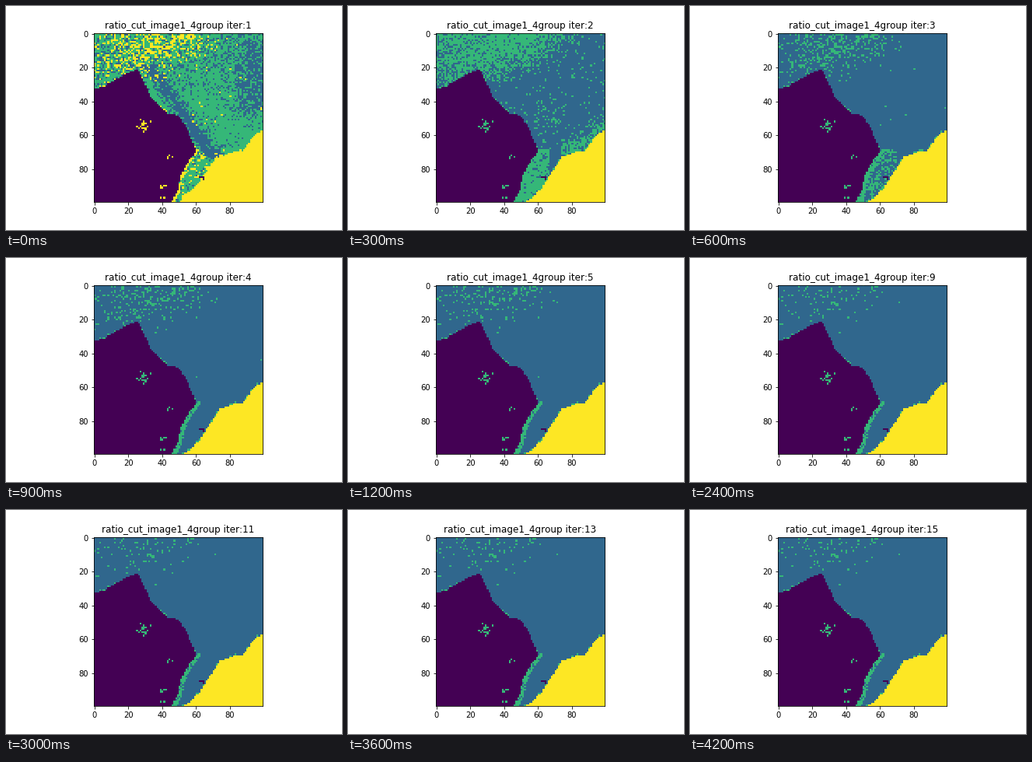
Animation, 432 px wide and 288 px high, one loop 4.5 s. Source, as a matplotlib script:

```python
import numpy as np
import matplotlib.pyplot as plt
from matplotlib.animation import FuncAnimation

N = 100
FRAMES = 15
PURPLE, BLUE, GREEN, YELLOW = range(4)

rng = np.random.default_rng(11)
grain = rng.normal(size=(N, N))
mix, fleck = rng.random((2, N, N))
Y, X = np.mgrid[0:N, 0:N] + .5
mid = np.arange(N) + .5


def curve(*points):
    """Polyline through the points, sampled at cell centres."""
    xs, ys = zip(*points)
    return np.interp(mid, xs, ys)


def bump(cx, cy, w):
    return np.exp(-((X - cx) ** 2 + (Y - cy) ** 2) / w ** 2)


def step(v, soft):
    return 1 / (1 + np.exp(-v / soft))


# Region outlines in cell units
ridge = curve((0, 33.2), (6, 32), (18, 24.8), (26, 21.5), (30, 30), (34, 39),
              (43, 47.5), (50, 49), (54, 55), (60.5, 70), (61, 100))
flank = curve((70, 60.5), (78, 54.5), (86, 50.8), (93, 49.5), (99.5, 46.5))
shore = curve((51, 100), (57, 97), (62, 92), (69, 81.5), (74, 74), (78, 72),
              (88, 69.5), (95, 60), (100, 57))

rock = (Y >= ridge) & (X < flank[:, None])
from_rock = X - flank[:, None]
low = (Y > 69) & (from_rock >= 0)
strip = low & (from_rock < 2.7)
rim = ~rock & (Y + 1 >= ridge) & (Y < 70) & (X < 60) & (fleck < .17)
depth = shore + rng.normal(0, .3, N) - Y
sand = (depth <= 0) & (X > 52)
first_sand = (depth <= np.clip(75 - X, 0, 3.5)) & (X > 52)

# Small patches that break up the regions
isles = fleck < (.8 * bump(29, 56, 3.1) + .9 * bump(44.3, 74, 1.5)
                 + .8 * bump(41, 91, 1.3) + .25 * bump(41, 97.5, 3))
dark = fleck > 1 - .9 * bump(63, 85.5, 1.3) - .12 * bump(29, 17, 3)

# Brightness that drives the speckle in the sky
side = ((X - 38) / 39) ** 2
fall = (np.maximum(0, Y - 8 + (X - 30) * .3) / 17) ** 2
light = np.maximum(-side - fall, -2.65) + .8 * bump(66, 46, 11) + grain

# Share of blue in the first pass
offset = X - 33 - (Y - 21) * .73
band = .9 * np.exp(-(offset / 6.5) ** 2) * (Y > 19) * (Y < 75)
east = .8 * step(X - 82, 4) * step(48 - Y, 3) * (.5 + .5 * step(Y - 8, 2))
blue_share = np.maximum(np.maximum(band, east), .08 + .22 * step(28 - Y, 4))


def first_pass():
    grid = np.where(mix < blue_share, BLUE, GREEN)
    grid[(light > .15) & ~low] = YELLOW
    grid[low & (mix > np.where(from_rock < 1.6, .15, .85))] = YELLOW
    grid[first_sand | rim] = YELLOW
    return grid


def later_pass(it):
    settle = np.exp(-(it - 3) / 2.2)
    level = -.95 if it == 2 else 1.15 - .8 * settle
    green = (light > level) & ~low
    green |= rim | strip & (mix < .8 + .1 * settle)
    green |= (depth < 1) & (X > 52) & (mix < .22 + .3 * settle)
    if it == 2:
        green |= low & (X < 67) & (mix < .85)
        green |= (X > 74) & (mix < .75 * np.exp(-(depth / 8) ** 2))
    elif it == 3:
        green |= low & (X < 70) & (mix < .35)
    grid = np.where(green, GREEN, BLUE)
    grid[sand] = YELLOW
    return grid


def labels(it):
    grid = first_pass() if it == 1 else later_pass(it)
    grid[rock] = PURPLE
    grid[rock & isles] = YELLOW if it == 1 else GREEN
    grid[dark] = PURPLE
    return grid


plt.rcParams.update({"font.family": "DejaVu Sans", "font.size": 10,
                     "text.kerning_factor": 6})
fig = plt.figure(figsize=(6, 4), dpi=72, facecolor="white")
fig.subplots_adjust(left=.125, right=.9, bottom=.125, top=.88)
ax = fig.add_subplot()
image = ax.imshow(labels(1), cmap="viridis", vmin=0, vmax=3, interpolation="nearest")
title = ax.set_title("", fontsize=12)


def update(i):
    image.set_data(labels(i + 1))
    title.set_text(f"ratio_cut_image1_4group iter:{i + 1}")
    return image, title


anim = FuncAnimation(fig, update, frames=FRAMES, interval=300, repeat=True,
                     repeat_delay=0, init_func=lambda: update(0))
plt.show()
```
